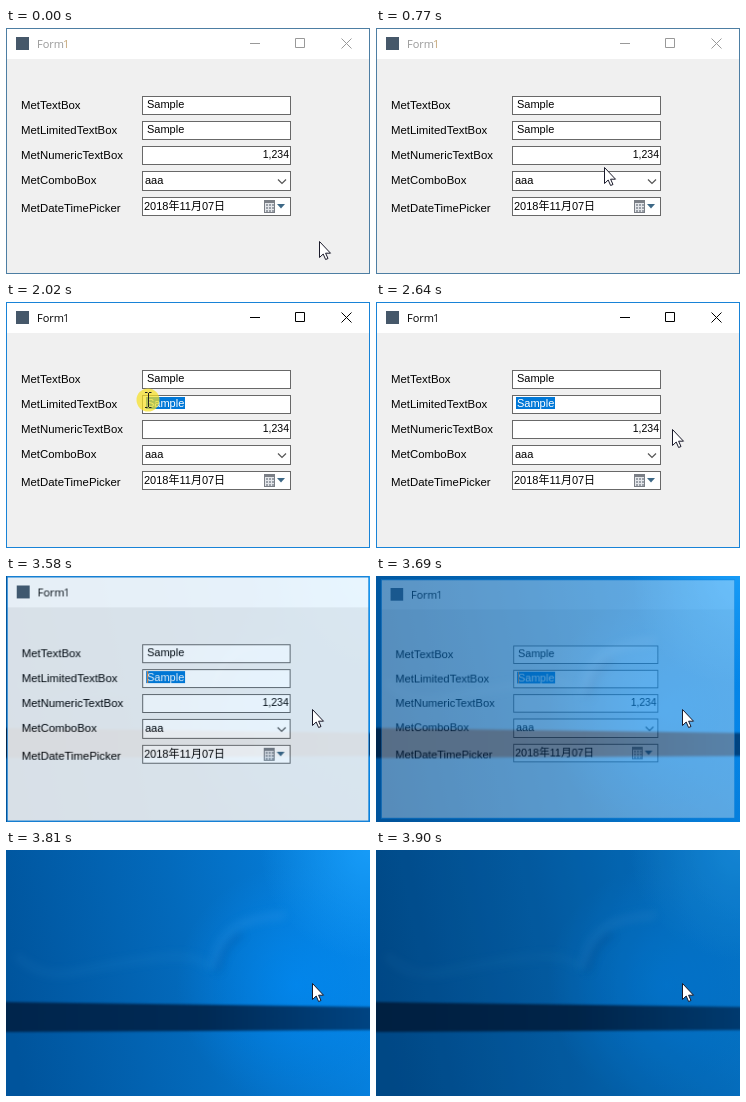
An HTML page with a canvas that plays this animation: 364 px wide and 246 px high, repeating every 4010 ms.

```html
<!DOCTYPE html>
<html lang="ja">
<head>
<meta charset="utf-8">
<title>Form1</title>
<style>
html, body { margin: 0; width: 364px; height: 246px; overflow: hidden; }
canvas { display: block; }
</style>
</head>
<body>
<canvas id="stage" width="364" height="246"></canvas>
<script>
const W = 364, H = 246, LOOP = 4010, CLOSE = 3580;
const screen2d = document.getElementById('stage').getContext('2d');

function layer() {
  const c = document.createElement('canvas');
  c.width = W;
  c.height = H;
  return c.getContext('2d');
}
const form = layer(), desk = layer();

// Moments at which the picture may change: [first, last, count]
const steps = [
  [0, 0, 1], [530, 1010, 7], [1080, 1320, 4], [1470, 1560, 2], [1710, 2170, 7],
  [2260, 2710, 7], [2800, 2800, 1], [3190, 3190, 1], [CLOSE, CLOSE, 1],
  [3690, 3690, 1], [3740, 3740, 1], [3810, 3810, 1], [3900, 3900, 1]
].flatMap(([a, b, n]) => Array.from({ length: n },
  (_, i) => n > 1 ? Math.round((a + (b - a) * i / (n - 1)) / 10) * 10 : a));

// Pointer path: [time, x, y]
const path = [
  [450, 313, 212], [770, 228, 138], [1010, 140, 122], [1160, 140, 122],
  [1320, 259, 124], [1560, 182, 103], [1710, 195, 104], [2020, 142, 98],
  [2090, 112, 95], [2170, 112, 95], [2640, 296, 126], [2710, 305, 131], [2800, 306, 132]
];

const within = (v, a, b) => v >= a && v <= b;

function pointerAt(t) {
  const i = path.findIndex(k => k[0] >= t);
  if (i < 0) return path[path.length - 1].slice(1);
  if (i === 0) return path[0].slice(1);
  const [t0, x0, y0] = path[i - 1], [t1, x1, y1] = path[i];
  const p = (t - t0) / (t1 - t0);
  return [Math.round(x0 + (x1 - x0) * p), Math.round(y0 + (y1 - y0) * p)];
}

function rect(c, color, x, y, w, h) {
  c.fillStyle = color;
  c.fillRect(x, y, w, h);
}

function text(c, str, x, y, size = 11, color = '#000', align = 'left') {
  c.font = `${size}px "Liberation Sans", "Noto Sans CJK JP", sans-serif`;
  c.textAlign = align;
  c.fillStyle = color;
  c.fillText(str, x, y);
}

function stroke(c, color, d, width = 1) {
  c.strokeStyle = color;
  c.lineWidth = width;
  c.stroke(new Path2D(d));
}

function glow(c, rgb, alpha, x, y, r) {
  const g = c.createRadialGradient(x, y, 0, x, y, r);
  g.addColorStop(0, `rgba(${rgb},${alpha})`);
  g.addColorStop(1, `rgba(${rgb},0)`);
  rect(c, g, 0, 0, W, H);
}

function paintDesktop(c) {
  const g = c.createLinearGradient(0, 150, W, 80);
  g.addColorStop(0, '#00549c');
  g.addColorStop(.5, '#036abc');
  g.addColorStop(1, '#0684e4');
  rect(c, g, 0, 0, W, H);
  glow(c, '0,144,255', .55, 290, 135, 120);
  glow(c, '30,165,255', .7, W, 0, 110);

  c.filter = 'blur(4px)';
  stroke(c, 'rgba(120,195,255,.13)', 'M207 118C214 76 240 68 280 65', 8);
  stroke(c, 'rgba(120,195,255,.06)', 'M10 105Q35 130 70 122T150 108T204 120', 8);
  stroke(c, 'rgba(0,60,130,.25)', 'M212 122Q216 96 236 84', 5);

  const band = c.createLinearGradient(0, 0, W, 0);
  band.addColorStop(0, '#00254c');
  band.addColorStop(.55, '#002a55');
  band.addColorStop(1, '#004482');
  c.filter = 'blur(.8px)';
  c.fillStyle = band;
  c.fill(new Path2D('M-9 152L373 157V180L-9 182Z'));
  c.filter = 'none';
}

function paintForm(c, t) {
  const active = t >= 1080;
  const ink = active ? '#000' : '#999';
  rect(c, active ? '#1883d7' : '#4d7ea3', 0, 0, W, H);
  rect(c, '#fff', 1, 1, W - 2, 30);
  rect(c, '#f0f0f0', 1, 31, W - 2, H - 32);

  rect(c, '#46586a', 10, 9, 13, 13);
  c.font = '11px "Open Sans", sans-serif';
  c.textAlign = 'left';
  c.fillStyle = ink;
  c.fillText('Form', 31, 20);
  c.fillStyle = active ? '#222' : '#c4a678';
  c.fillText('1', 57, 20);
  // The caption buttons vanish as soon as the window closes
  if (t < CLOSE) stroke(c, ink, 'M244 15.5h10M289.5 10.5h9v9h-9zM335.5 10.5l10 10M345.5 10.5l-10 10');

  const labels = [['TextBox', 81], ['LimitedTextBox', 106], ['NumericTextBox', 131],
    ['ComboBox', 156], ['DateTimePicker', 184]];
  labels.forEach(([name, y], i) => {
    text(c, 'Met' + name, 15, y, 11.4);
    const top = 68 + i * 25 + (i > 3);
    rect(c, '#686868', 136, top, 149, i === 3 ? 20 : 19);
    rect(c, '#fff', 137, top + 1, 147, i === 3 ? 18 : 17);
  });
  text(c, 'Sample', 141, 80);
  text(c, 'Sample', 141, 105);
  text(c, '1,234', 283, 130, 10.5, '#000', 'right');
  text(c, 'aaa', 139, 156);
  text(c, '2018年11月07日', 138, 182);

  stroke(c, '#555', 'M272 151.5l4 4l4 -4', 1.2);
  rect(c, '#7b7f86', 258, 172, 11, 13);
  rect(c, '#e4e6ea', 259, 175, 9, 9);
  for (let i = 0; i < 9; i++)
    rect(c, '#9aa0a8', 260 + i % 3 * 3, 176 + Math.floor(i / 3) * 3, 2, 2);
  c.fillStyle = '#3d6886';
  c.fill(new Path2D('M271 176h8l-4 4.5z'));

  if (t >= 1710) paintSelection(c, t);
}

function paintSelection(c, t) {
  const letter = 39 / 6;
  const x = t >= 2020 ? 140 : pointerAt(t)[0];
  const from = 140 + Math.min(6, Math.max(0, Math.round((x - 140) / letter))) * letter;
  c.save();
  c.beginPath();
  c.rect(from, 95, 179 - from, 12);
  c.clip();
  rect(c, '#0078d7', 140, 95, 39, 12);
  text(c, 'Sample', 141, 105, 11, '#fff');
  c.restore();
  if (within(t, 2090, 2639) || t >= 3190) rect(c, '#ff8728', 141, 95, 1, 12);
}

function paintPointer(c, t) {
  const [x, y] = pointerAt(t);
  const pressed = within(t, 1080, 1160) || within(t, 1710, 2090);
  const overField = within(x, 136, 285) && [68, 93, 118].some(top => within(y, top, top + 18));
  c.save();
  c.translate(x, y);
  if (pressed) {
    c.fillStyle = 'rgba(246,224,36,.72)';
    c.beginPath();
    c.arc(0, 0, 11.5, 0, 7);
    c.fill();
  }
  if (pressed || overField) {
    stroke(c, '#222', 'M-3 -7.5h2.5M1 -7.5h2.5M.5 -7v14M-3 7.5h2.5M1 7.5h2.5');
  } else {
    const arrow = 'M.5 1.5V17.5L4.2 14L6.6 19.5L9 18.5L6.6 13.2H11.5Z';
    c.fillStyle = '#fff';
    c.fill(new Path2D(arrow));
    stroke(c, '#1a1a2a', arrow);
  }
  c.restore();
}

function frame(now) {
  const clock = now % LOOP;
  const t = steps.filter(s => s <= clock).pop();
  const c = screen2d;
  c.drawImage(desk.canvas, 0, 0);
  const alpha = t < CLOSE ? 1 : Math.max(0, 1 - (t - 3560) / 203);
  if (alpha > 0) {
    paintForm(form, t);
    const k = 1 - .041 * (1 - alpha);
    c.globalAlpha = alpha;
    c.drawImage(form.canvas, W * (1 - k) / 2, H * (1 - k) / 2, W * k, H * k);
    c.globalAlpha = 1;
  }
  if (t >= 3900) rect(c, 'rgba(0,0,0,.15)', 0, 0, W, H);
  paintPointer(c, t);
  requestAnimationFrame(frame);
}

paintDesktop(desk);
requestAnimationFrame(frame);
</script>
</body>
</html>
```
